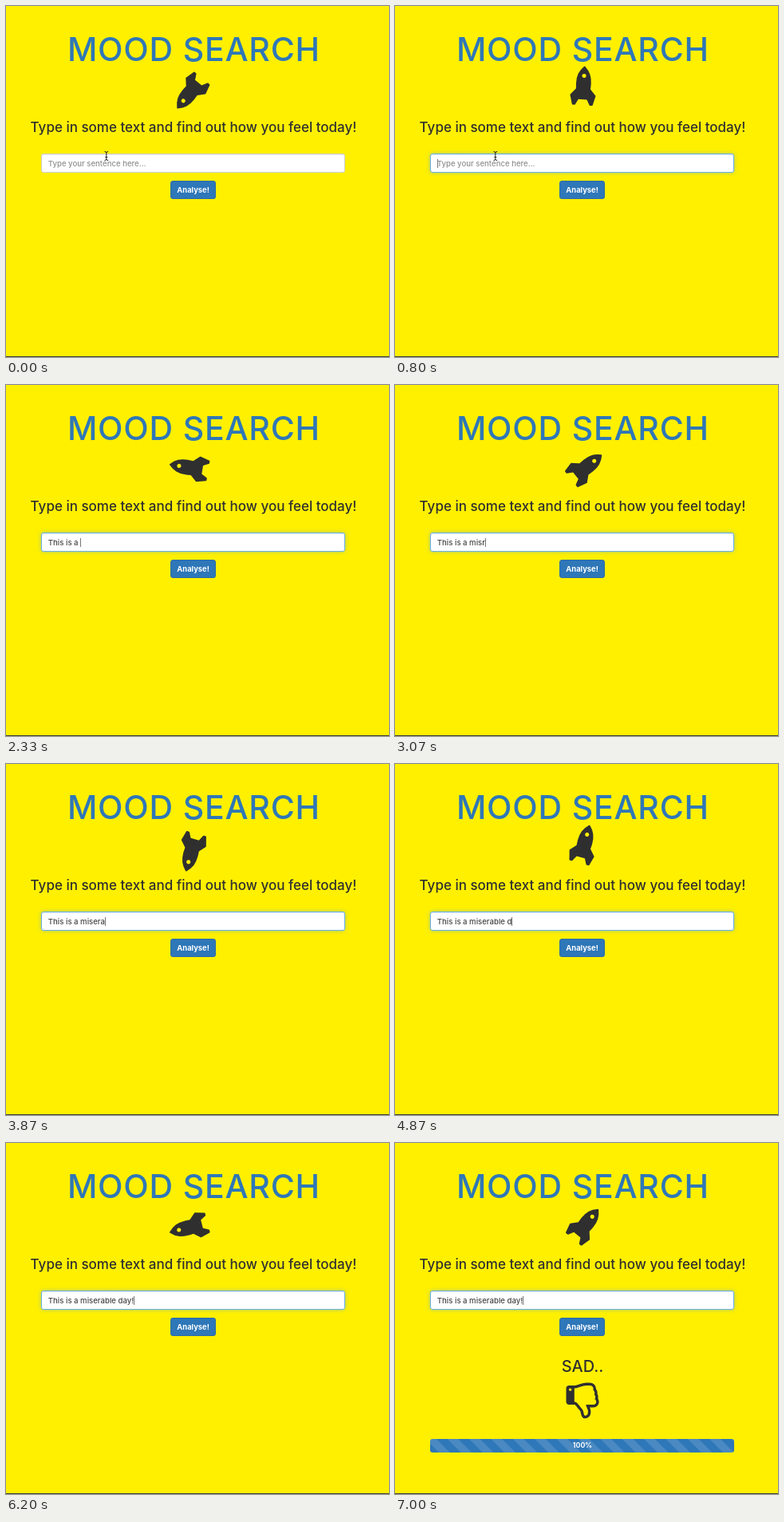
An HTML page for the animation above (7.07 s loop, 480x440 px).

```html
<!DOCTYPE html>
<html lang="en">
<head>
<meta charset="utf-8">
<title>Mood search</title>
<style>
  html, body { margin: 0; width: 100%; height: 100%; overflow: hidden; background: #fff000; }
  body { font: 500 9.6px Inter, "Open Sans", sans-serif; color: #444; }
  div { position: absolute; box-sizing: border-box; }
  #stage { left: 0; top: 0; width: 480px; height: 440px; overflow: hidden; border-bottom: 1px solid #3c3c3c; }
  svg { position: absolute; left: 0; top: 0; fill: #2f2f30; }
  #field {
    left: 44px; top: 185px; width: 381px; height: 24px; padding-left: 7.8px;
    border: 1px solid #ccc; border-radius: 3px; background: #fff;
    box-shadow: inset 0 1px 1px #0001; line-height: 24px; white-space: pre;
  }
  #field.focus { border-color: #66afe9; box-shadow: inset 0 1px 1px #0001, 0 0 5px #66afe999; }
  #caret { display: inline-block; width: 1px; height: 11px; background: #777; vertical-align: -2px; }
  #hint { left: 7.8px; top: 0; color: #8f8f8f; }
  #button {
    left: 206px; top: 219px; width: 57px; height: 23px;
    border: 1px solid #2e6da4; border-radius: 3px; background: #2e77b8;
  }
  #bar {
    left: 44px; top: 371px; width: 381px; height: 17px; border-radius: 3px;
    background: #2e77b8 linear-gradient(45deg, #fff2 25%, #0000 25%, #0000 50%, #fff2 50%, #fff2 75%, #0000 75%) 0 0 / 27.4px 27.4px;
  }
</style>
</head>
<body>
<div id="stage">
  <div id="field"><span id="typed"></span><span id="caret"></span><div id="hint">Type your sentence here...</div></div>
  <div id="button"></div>
  <div id="bar"></div>
  <svg width="480" height="440" text-anchor="middle" fill-rule="evenodd">
    <text x="235.4" y="69" font-size="41" letter-spacing=".8" fill="#2e77b8">MOOD SEARCH</text>
    <text x="235" y="158" font-size="17">Type in some text and find out how you feel today!</text>
    <text x="234.6" y="234.2" font-size="9.4" font-weight="700" fill="#fff">Analyse!</text>
    <path id="rocket" d="M1440 1088q0 40-28 68t-68 28t-68-28t-28-68t28-68t68-28t68 28t28 68z
      M1671 1387q0-249-75.5-430.5t-253.5-360.5q-81-80-195-176l-20-379q-2-16-16-26l-384-224q-7-4-16-4
      q-12 0-23 9l-64 64q-13 14-8 32l85 276l-281 281l-276-85q-3-1-9-1q-14 0-23 9l-64 64q-17 19-5 39
      l224 384q10 14 26 16l379 20q96 114 176 195q188 187 358 258t431 71q14 0 24-9.5t10-22.5z"/>
    <g id="result">
      <text x="235" y="287" font-size="20">SAD..</text>
      <path transform="translate(214.5 304) scale(.0268)" d="M256 192q0 26-19 45t-45 19t-45-19t-19-45t19-45t45-19t45 19t19 45z
        M1408 768q0 51-39 89.5t-89 38.5h-352q0 58 48 159.5t48 160.5q0 98-32 145t-128 47q-26-26-38-85t-30.5-125.5
        t-59.5-109.5q-22-23-77-91q-4-5-23-30t-31.5-41t-34.5-42.5t-40-44t-38.5-35.5t-40-27t-35.5-9h-32v-640h32
        q13 0 31.5-3t33-6.5t38-11t35-11.5t35.5-12.5t29-10.5q211-73 342-73h121q192 0 192 167q0 26-5 56
        q30 16 47.5 52.5t17.5 73.5t-18 69q53 50 53 119q0 25-10 55.5t-25 47.5q32 1 53.5 47t21.5 81z
        M1536 769q0-89-49-163q9-33 9-69q0-77-38-144q3-21 3-43q0-101-60-178q1-139-85-219.5t-227-80.5h-129
        q-96 0-189.5 22.5t-216.5 65.5q-116 40-138 40h-288q-53 0-90.5 37.5t-37.5 90.5v640q0 53 37.5 90.5t90.5 37.5h274
        q36 24 137 155q58 75 107 128q24 25 35.5 85.5t30.5 126.5t62 108q39 37 90 37q84 0 151-32.5t102-101.5t35-186
        q0-93-48-192h176q104 0 180-76t76-179z"/>
      <text x="235" y="382" font-size="8.7" font-weight="700" fill="#fff">100%</text>
    </g>
    <path id="pointer" d="M123.5 182.5q2.3 0 2.3 1.5q0-1.5 2.3-1.5M125.8 184v8M123.5 193.5q2.3 0 2.3-1.5q0 1.5 2.3 1.5M124.3 189.5h3"
      fill="none" stroke="#222"/>
  </svg>
</div>
<script>
  const el = id => document.getElementById(id);
  const show = (id, on) => el(id).style.visibility = on ? 'visible' : 'hidden';

  const LOOP = 7070, STEPS = 106, RATE = 0.015; // 15 steps per second
  const FOCUS = 6, RESULT = 98;
  const keys = 'This is a misr\berable day!';
  const pressed = [14, 16, 18, 20, 22, 24, 26, 28, 30, 32, 38, 40, 42, 45, 50, 53, 56, 58, 60, 62, 64, 66, 72, 75, 76, 78];

  function draw(now) {
    const step = Math.min(STEPS - 1, Math.floor((now % LOOP + 4) * RATE));
    const count = pressed.filter(p => p <= step).length;
    const text = keys.slice(0, count).replace(/.[\b]/, '');
    const focused = step >= FOCUS, done = step >= RESULT;
    const lastEvent = done ? RESULT : count ? pressed[count - 1] : FOCUS;

    el('typed').textContent = text;
    el('field').className = focused ? 'focus' : '';
    show('caret', focused && Math.floor((step - lastEvent) / 7.5) % 2 === 0);
    show('hint', !text);
    show('pointer', !text);
    show('result', done);
    show('bar', done);
    el('bar').style.backgroundPositionX = 27.4 * (1 - (step - RESULT) / 30) + 'px';
    el('rocket').setAttribute('transform',
      `translate(234.7 105.6) rotate(${174.5 + step * 12}) scale(.0268 -.0268) translate(-832 -640)`);
  }

  const start = performance.now();
  (function tick() {
    draw(performance.now() - start);
    requestAnimationFrame(tick);
  })();
</script>
</body>
</html>
```
